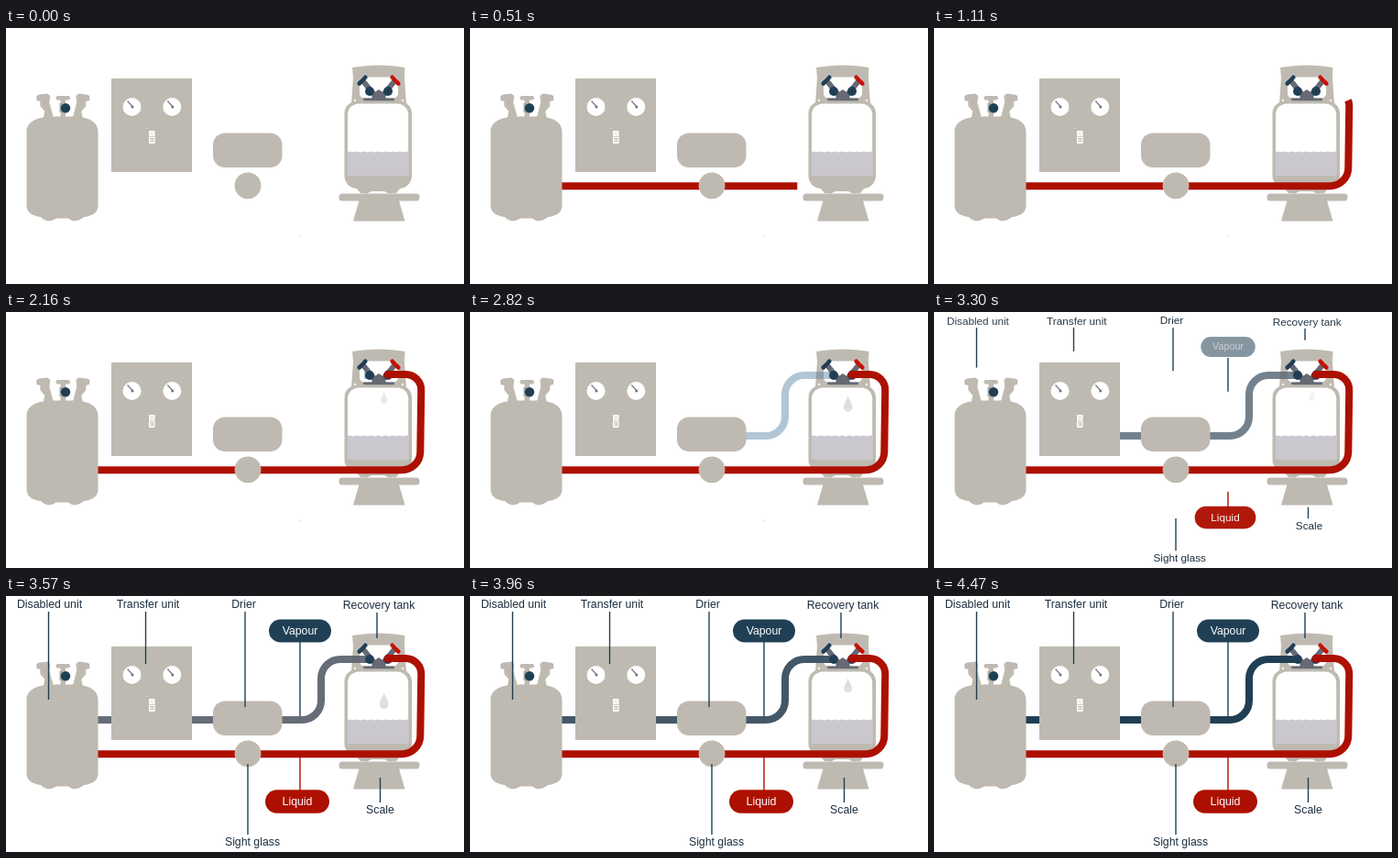
Write an HTML page with a canvas that moves like this. It is 500 by 279 pixels and loops after 6.47 s.

```html
<!DOCTYPE html>
<html lang="en">
<head>
<meta charset="utf-8">
<title>Liquid recovery diagram</title>
<style>
html, body { margin: 0; width: 100%; height: 100%; overflow: hidden; background: #fff; }
canvas { display: block; width: 100vw; height: 100vh; }
</style>
</head>
<body>
<canvas id="stage"></canvas>
<script>
const W = 500, H = 279, LOOP = 6470, STEP = 30, HOLD = 4470;
const GREY = '#bfbab1', NAVY = '#213f54', RED = '#ad1000', STEEL = '#656a74', WHITE = '#fff';
const canvas = document.getElementById('stage');
const ctx = canvas.getContext('2d');

// Piecewise linear tracks: [time, value, ...]
const RED_LEN = [[0, 0], [660, 333], [1110, 437], [1320, 459], [1470, 478]];
const BLUE_LEN = [[2130, 0], [2790, 132], [2820, 146], [3120, 248], [3480, 346]];
const BLUE_TINT = [
  [2820, 70, 120, 155, .42], [3120, 92, 114, 129, .8],
  [3570, 95, 102, 113, .95], [4350, 33, 63, 84, 1]
];

// text, x, y, start offset x, y, fade speed
const LABELS = [
  ['Disabled unit', 47.5, 9, 2, 4, 1.15],
  ['Transfer unit', 155, 9, 4, 4, 1.2],
  ['Drier', 259.5, 9, 0, 0, 1.9],
  ['Recovery tank', 407, 10.5, 1, 3, 1.2],
  ['Scale', 408.5, 233, 5, 1, 1.6],
  ['Sight glass', 269, 268, -4, 0, 1.6]
];

// x, from y, to y
const LEADERS = [
  [46.5, 17, 113], [152.5, 17, 74], [261, 17, 121],
  [405, 18, 46], [408.5, 225, 198], [264, 260, 183]
];

const clamp = v => Math.max(0, Math.min(1, v));
const ramp = (t, a, b) => clamp((t - a) / (b - a));

function track(keys, t) {
  let i = 0;
  while (i < keys.length - 2 && t > keys[i + 1][0]) i++;
  const a = keys[i], b = keys[i + 1], p = ramp(t, a[0], b[0]);
  return a.slice(1).map((v, k) => v + (b[k + 1] - v) * p);
}

function fill(color, build) {
  ctx.fillStyle = color;
  ctx.beginPath();
  build();
  ctx.fill();
}

const rect = (x, y, w, h, color, r = 0) => fill(color, () => ctx.roundRect(x, y, w, h, r));
const disc = (x, y, r, color) => fill(color, () => ctx.arc(x, y, r, 0, 7));
const poly = (color, ...p) => fill(color, () => {
  for (let i = 0; i < p.length; i += 2) ctx.lineTo(p[i], p[i + 1]);
  ctx.closePath();
});

function line(x1, y1, x2, y2, color, w) {
  ctx.strokeStyle = color;
  ctx.lineWidth = w;
  ctx.beginPath();
  ctx.moveTo(x1, y1);
  ctx.lineTo(x2, y2);
  ctx.stroke();
}

function pipe(len, color, build) {
  if (len <= 0) return;
  ctx.strokeStyle = color;
  ctx.lineWidth = 8;
  ctx.setLineDash([len, 2000]);
  ctx.beginPath();
  build();
  ctx.stroke();
  ctx.setLineDash([]);
}

function bluePipe(t) {
  const [r, g, b, a] = track(BLUE_TINT, t);
  pipe(track(BLUE_LEN, t)[0], `rgba(${r},${g},${b},${a})`, () => {
    ctx.moveTo(397, 69);
    ctx.arcTo(344, 69, 344, 135, 21);
    ctx.arcTo(344, 135, 100, 135, 21);
    ctx.lineTo(100, 135);
  });
}

function redPipe(t) {
  const len = track(RED_LEN, t)[0];
  pipe(len, RED, () => {
    ctx.moveTo(100, 172.2);
    ctx.arcTo(452, 172.2, 453.5, 68, 20);
    ctx.arcTo(453.5, 68, 417, 68, 17);
    ctx.lineTo(417, 68);
  });
  if (len > 473) disc(417.3, 68.2, 4.6, RED);
}

function cylinder() {
  fill(GREY, () => {
    ctx.moveTo(22.5, 113);
    ctx.bezierCurveTo(22.5, 102, 34, 97, 50, 96.5);
    ctx.lineTo(74, 96.5);
    ctx.bezierCurveTo(90, 97, 100.5, 102, 100.5, 113);
    ctx.lineTo(100.5, 194);
    ctx.quadraticCurveTo(100, 204, 85, 206);
    ctx.quadraticCurveTo(80, 211, 72, 210);
    ctx.lineTo(68, 207.5);
    ctx.lineTo(55, 207.5);
    ctx.lineTo(50, 210);
    ctx.quadraticCurveTo(42, 211, 38, 206);
    ctx.quadraticCurveTo(23, 204, 22.5, 194);
  });
  for (const side of [1, -1]) {
    ctx.save();
    ctx.translate(62.3, 0);
    ctx.scale(side, 1);
    poly(GREY, -29, 74, -26, 72.5, -17, 71.5, -14, 74, -15, 81, -10.5, 98,
      -21.5, 98, -20, 91, -25, 85, -25, 80, -29, 79);
    ctx.restore();
  }
  rect(54.5, 74, 15.5, 4.5, GREY, 2);
  rect(59.5, 77, 5.5, 20, GREY);
  rect(58.5, 82, 3, 10, '#a9a7a3');
  disc(65, 87.3, 5.2, NAVY);
}

function transferUnit() {
  rect(115, 55, 88, 102, GREY);
  for (const x of [137.5, 181.3]) {
    disc(x, 86, 10, WHITE);
    line(x - 5, 79.5, x + 1, 86, '#77787a', 1.2);
    disc(x + .5, 86, 1.6, '#77787a');
  }
  rect(156, 112, 6.5, 14, WHITE);
  line(156.5, 118.5, 162, 118.5, '#d0ccc6', 1);
  line(159.2, 113.5, 159.2, 116.5, GREY, 1);
  ctx.strokeStyle = GREY;
  ctx.strokeRect(158, 120.5, 2.5, 3);
}

function tank() {
  fill(GREY, () => {
    ctx.moveTo(378, 43);
    ctx.quadraticCurveTo(407, 38, 435.5, 43);
    ctx.lineTo(435, 54);
    ctx.lineTo(437, 83);
    ctx.lineTo(377, 83);
    ctx.lineTo(379, 54);
  });
  rect(386, 53.5, 42, 23, WHITE, 5);
  disc(381, 79, 1.2, WHITE);
  disc(433, 79, 1.2, WHITE);
  fill(GREY, () => ctx.roundRect(369.5, 80, 73.5, 95, [13, 13, 14, 14]));
  poly(GREY, 382, 174, 431, 174, 426, 180, 418, 180.5, 413, 178, 399, 178, 394, 180.5, 387, 180);
  rect(373, 82.5, 66.2, 78.5, WHITE, [12, 12, 1, 1]);
  fill('#cbc7cf', () => {
    ctx.moveTo(373, 161);
    for (let x = 373; x <= 439; x += 2) ctx.lineTo(x, 135 + .5 * Math.sin(x * .8));
    ctx.lineTo(439.2, 161);
  });
  rect(363.5, 180.5, 88, 8, GREY, 3.5);
  poly(GREY, 385.5, 188, 429, 188, 435.5, 210.5, 379, 210.5);
}

function valves() {
  rect(390, 76.5, 34, 2.8, STEEL, 1);
  poly(STEEL, 399, 77, 401, 71, 407, 67, 413, 71, 415, 77);
  for (const [side, color] of [[1, NAVY], [-1, '#c41208']]) {
    ctx.save();
    ctx.translate(407, 0);
    ctx.scale(side, 1);
    line(-17, 58, -5, 73, STEEL, 6);
    ctx.translate(-18, 57.2);
    ctx.rotate(-.8);
    rect(-7, -2.3, 14, 4.6, color, 2.2);
    ctx.restore();
    disc(407 - side * 10, 69, 5, NAVY);
  }
}

function drops(t) {
  const start = 2130, period = 585, phase = (t - start) % period;
  if (t <= start || t >= HOLD) return;
  const y = 91 + phase * .085;
  const s = .65 + .35 * ramp(phase, 0, 110);
  ctx.save();
  ctx.beginPath();
  ctx.rect(400, 80, 30, 60);
  ctx.clip();
  ctx.globalAlpha = ramp(phase, -30, 60) * (1 - ramp(phase, 470, period));
  ctx.translate(412.7, y);
  ctx.scale(s, s);
  fill('#e0dedf', () => {
    ctx.moveTo(0, -9.5);
    ctx.bezierCurveTo(1, -4, 4.8, -1, 4.8, 4);
    ctx.bezierCurveTo(4.8, 10.5, -4.8, 10.5, -4.8, 4);
    ctx.bezierCurveTo(-4.8, -1, -1, -4, 0, -9.5);
  });
  ctx.restore();
}

// Fades and scales a drawing up around its own centre.
function pop(x, y, p, alpha, draw) {
  if (p <= 0) return;
  const s = .77 + .23 * p;
  ctx.save();
  ctx.globalAlpha = clamp(alpha);
  ctx.translate(x, y);
  ctx.scale(s, s);
  draw();
  ctx.restore();
}

function text(str, color) {
  ctx.fillStyle = color;
  ctx.fillText(str, 0, .5);
}

function pill(str, x, y, w, h, color, p) {
  pop(x, y, p, p * 1.2, () => {
    rect(-w / 2, -h / 2, w, h, color, h / 2);
    text(str, WHITE);
  });
}

function captions(t) {
  const p = ramp(t, 2820, 3420), late = ramp(t, 3150, 3480);
  if (late > 0) {
    for (const [x, a, b] of LEADERS) line(x, a, x, a + (b - a) * late, NAVY, 1.4);
    line(321, 50, 321, 50 + 81 * late, NAVY, 1.4);
    line(321, 212, 321, 212 - 36 * late, RED, 1.4);
  }
  for (const [str, x, y, dx, dy, speed] of LABELS) {
    pop(x + dx * (1 - p), y + dy * (1 - p), p, p * speed, () => text(str, '#1c2f40'));
  }
  pill('Vapour', 321, 38, 68, 25, NAVY, late);
  pill('Liquid', 318, 224, 70, 25.5, RED, p);
}

function draw(t) {
  ctx.fillStyle = WHITE;
  ctx.fillRect(0, 0, W, H);
  rect(320.5, 227, 1, 1, '#cfcccc');
  tank();
  drops(t);
  bluePipe(t);
  valves();
  redPipe(t);
  cylinder();
  transferUnit();
  rect(226, 114.5, 75.5, 37.5, GREY, 13);
  disc(264, 171.8, 14.4, GREY);
  captions(t);
}

function resize() {
  const dpr = window.devicePixelRatio || 1;
  canvas.width = Math.round(innerWidth * dpr);
  canvas.height = Math.round(innerHeight * dpr);
  ctx.setTransform(canvas.width / W, 0, 0, canvas.height / H, 0, 0);
  ctx.font = '12.3px "Liberation Sans", Arial, sans-serif';
  ctx.textAlign = 'center';
  ctx.textBaseline = 'middle';
}

const began = performance.now();
function frame() {
  const t = (performance.now() - began) % LOOP;
  draw(Math.min(HOLD, Math.floor(t / STEP) * STEP));
  requestAnimationFrame(frame);
}

addEventListener('resize', resize);
resize();
frame();
</script>
</body>
</html>
```
